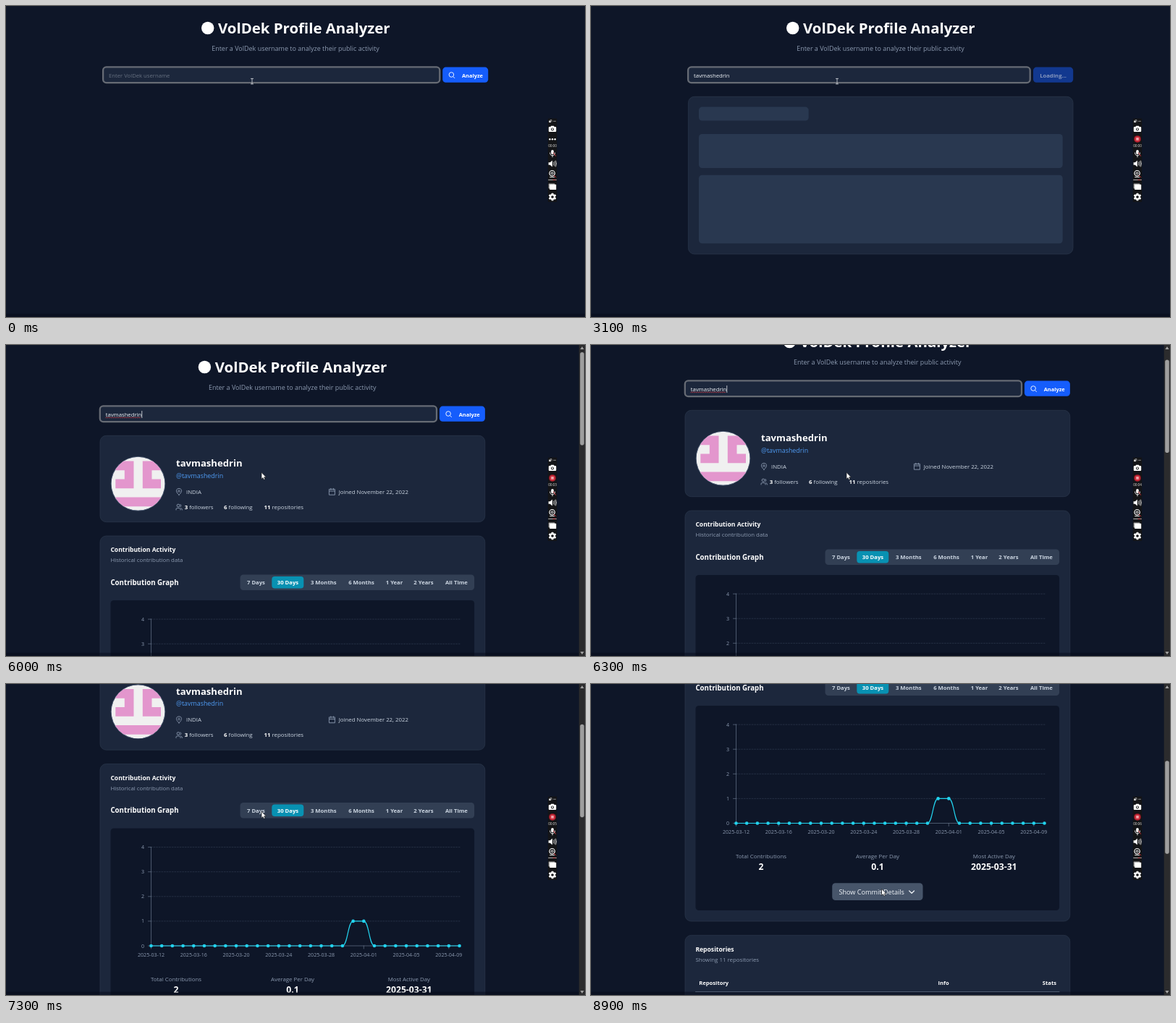
Animation, 800 px wide and 430 px high, one loop 9 s. Source, as an HTML page:

```html
<!DOCTYPE html>
<html lang="en">
<head>
<meta charset="utf-8">
<title>Profile Analyzer</title>
<style>
  html, body { margin: 0; width: 100%; height: 100%; overflow: hidden; background: #0e1628; }
  svg { display: block; width: 800px; height: 430px; font-family: "Open Sans", "Noto Sans", sans-serif; }
  text { white-space: pre; }
  .b { font-weight: 700; }
  .line { fill: none; stroke-width: .9; stroke-linecap: round; stroke-linejoin: round; }
</style>
</head>
<body>
<svg id="stage" viewBox="0 0 800 430"></svg>
<script>
const BG = '#0e1628', CARD = '#1c273c', SLATE = '#323f54', MUTED = '#8c9ab0',
      SOFT = '#cbd5e1', WHITE = '#ffffff', CYAN = '#22d3ee', HINT = '#667080';
const USER = 'tavmashedrin';
const LOOP = 9000, STEP = 100;
const LOAD = 2500, DONE = 5000, RECORD = 2200, HOVER = 8800;

// Text is placed by its vertical centre.
const text = (x, cy, size, str, fill = WHITE, { bold = 0, anchor = 'start', id = '' } = {}) =>
  `<text ${id && `id="${id}"`} x="${x}" y="${(cy + size * .355).toFixed(2)}" font-size="${size}" fill="${fill}"` +
  ` text-anchor="${anchor}" ${bold ? 'class="b"' : ''}>${str}</text>`;
const rect = (x, y, w, h, rx, fill, extra = '') =>
  `<rect x="${x}" y="${y}" width="${w}" height="${h}" rx="${rx}" fill="${fill}" ${extra}/>`;
const circle = (cx, cy, r, fill, extra = '') =>
  `<circle cx="${cx}" cy="${cy}" r="${r}" fill="${fill}" ${extra}/>`;
const line = (d, stroke, extra = '') => `<path class="line" d="${d}" stroke="${stroke}" ${extra}/>`;
const group = (id, body, extra = '') => `<g id="${id}" ${extra}>${body}</g>`;
const card = (x, y, w, h) => rect(x, y, w, h, 8.5, CARD, 'stroke="#2b384d" stroke-width=".7"');
const each = (n, fn) => Array.from({ length: n }, (_, i) => fn(i)).join('');
const mid = { anchor: 'middle' }, bold = { bold: 1 }, boldMid = { bold: 1, anchor: 'middle' };

function header() {
  return circle(278.7, 30.5, 8.7, WHITE) +
    text(293, 31.2, 20.4, 'VolDek Profile Analyzer', WHITE, bold) +
    text(400, 58.7, 8.97, 'Enter a VolDek username to analyze their public activity', MUTED, mid) +
    rect(134.1, 84.4, 465.2, 21.7, 4.5, CARD, 'id="field" stroke="#666b74" stroke-width="2.3"') +
    text(142, 96, 7.7, '', HINT, { id: 'entry' }) +
    line('', '#e0444e', 'id="squiggle" style="stroke-width:.7"') +
    rect(0, 91, .7, 10, 0, WHITE, 'id="caret"') +
    group('analyze', rect(603.2, 84.6, 63, 21.2, 4.5, '#155dfc') +
      line('M618.2 98 L619.8 99.6', WHITE) +
      circle(615.4, 95, 3.3, 'none', 'stroke="#fff" stroke-width=".9"') +
      text(644.5, 96, 7.45, 'Analyze', WHITE, boldMid)) +
    group('loading', rect(611, 84.6, 55.2, 21.2, 4.5, '#12388f') +
      text(638.6, 96, 7.7, 'Loading...', '#8596bd', boldMid));
}

function skeleton() {
  const block = (y, w, h) => rect(149, y, w, h, 4.5, '#293850');
  return card(134.4, 125.3, 531.6, 217.7) + block(139.6, 151.7, 19) + block(177, 502.7, 47) + block(233.7, 502.7, 94.6);
}

function avatar() {
  const rows = ['11011', '01010', '11011', '00000', '11111'];
  const cells = rows.map((row, r) => [...row].map((on, c) =>
    on === '1' ? `M${151.3 + c * 12.5} ${160.5 + r * 12.5} h12.7 v12.7 h-12.7z` : '').join('')).join('');
  return `<clipPath id="round">${circle(182.5, 191.8, 37, WHITE)}</clipPath>` +
    circle(182.5, 191.8, 37.7, '#526078') +
    `<g clip-path="url(#round)">${circle(182.5, 191.8, 37, '#f0f0f0')}<path d="${cells}" fill="#e396cd"/></g>`;
}

function profile() {
  const count = (x, n, label) =>
    text(x, 224, 7.85, `<tspan class="b" fill="#fff">${n}</tspan> ${label}`, SOFT);
  return card(130, 125.3, 531.8, 119.4) + avatar() +
    text(235, 163.5, 13.1, USER, WHITE, bold) +
    text(235, 180.5, 8.9, '@' + USER, '#4f9cf5') +
    line('M239 207.3 C233.6 202.5 235 198.4 239 198.4 S244.4 202.5 239 207.3Z', MUTED) +
    circle(239, 202, 1.3, 'none', `stroke="${MUTED}" stroke-width=".8"`) +
    text(249, 203, 7.85, 'INDIA', SOFT) +
    line('M446.8 199.4h7.6v7.8h-7.6z M446.8 202h7.6 M448.8 198.3v2 M452.4 198.3v2', MUTED) +
    text(459.7, 203, 7.85, 'Joined November 22, 2022', SOFT) +
    circle(238, 222, 1.9, 'none', `stroke="${MUTED}" stroke-width=".9"`) +
    line('M235 228 V227 Q235 225.5 236.6 225.5 H239.4 Q241 225.5 241 227 V228 M241 220.3 Q243.2 222 241 223.8 M242 225.6 Q243.5 226 243.5 228', MUTED) +
    count(246.7, 3, 'followers') + count(301, 6, 'following') + count(356.5, 11, 'repositories');
}

const PX = i => 200.5 + i * 14.69, PY = v => 515.5 - v * 34.1;
const COUNT = 30, isPeak = i => i === 19 || i === 20;

function chart() {
  const day = i => new Date(Date.UTC(2025, 2, 12 + i)).toISOString().slice(0, 10);
  const grid = each(5, v =>
    (v ? line(`M200.5 ${PY(v)} H627`, '#344156', 'stroke-dasharray="1.8 1.8" style="stroke-width:.6"') : '') +
    line(`M196.5 ${PY(v)} H200.5`, '#66748a', 'style="stroke-width:.7"') +
    text(191, PY(v), 7.1, v, MUTED, { anchor: 'end' }));
  const dates = each(8, k =>
    line(`M${PX(k * 4)} 515.5 v4`, '#66748a', 'style="stroke-width:.7"') +
    text(PX(k * 4), 527.5, 7.1, day(k * 4), MUTED, mid));
  const slope = (a, b, va, vb) => {
    const m = (PX(a) + PX(b)) / 2;
    return `C${m} ${PY(va)} ${m} ${PY(vb)} ${PX(b)} ${PY(vb)}`;
  };
  const curve = `M${PX(0)} ${PY(0)} H${PX(18)} ${slope(18, 19, 0, 1)} H${PX(20)} ${slope(20, 21, 1, 0)} H${PX(29)}`;
  return grid + dates +
    line('M200.5 379 V515.5 H627', '#66748a', 'style="stroke-width:.7"') +
    group('marker', line(`M${PX(10)} 379 V515.5`, '#b4b9c2')) +
    line(curve, CYAN, 'style="stroke-width:1.2"') +
    each(COUNT, i => circle(PX(i).toFixed(2), PY(isPeak(i) ? 1 : 0), 2.3, CYAN)) +
    circle(PX(10), PY(0), 3.4, CYAN, 'id="active"');
}

function activity() {
  const tabs = [['7 Days', 345.5], ['30 Days', 389.5], ['3 Months', 438.8], ['6 Months', 491],
                ['1 Year', 536.5], ['2 Years', 577], ['All Time', 622.4]];
  const stats = [['Total Contributions', '2', 235], ['Average Per Day', '0.1', 396], ['Most Active Day', '2025-03-31', 556.8]];
  return card(130, 264, 531.8, 387) +
    text(144.4, 283.2, 8.58, 'Contribution Activity', WHITE, bold) +
    text(144.4, 297.4, 7.86, 'Historical contribution data', MUTED) +
    text(144.4, 328.4, 9.7, 'Contribution Graph', WHITE, bold) +
    rect(323.5, 317.5, 323.6, 21.6, 4.5, SLATE) + rect(367.3, 320, 44, 16.4, 4, '#0891b2') +
    tabs.map(([s, x], i) => text(x, 328.3, 7.7, s, i === 1 ? WHITE : SOFT, boldMid)).join('') +
    rect(144.5, 353, 502.6, 283, 4.5, BG) + chart() +
    stats.map(([s, v, x]) => text(x, 561.5, 7.86, s, MUTED, mid) + text(x, 575.7, 12.2, v, WHITE, boldMid)).join('') +
    rect(333.2, 598.3, 125.3, 23.7, 4.5, SLATE, 'id="details"') +
    text(342.4, 610.5, 9.15, 'Show Commit Details', '#f1f5f9') +
    line('M439.7 609 l3.4 3.3 l3.4 -3.3', '#f1f5f9', 'style="stroke-width:1.2"') +
    group('tooltip', rect(0, 0, 80.5, 44, 4.5, CARD, 'stroke="#2f3c52" stroke-width=".7"') +
      text(7.2, 16, 9.6, '2025-03-22', '#e2e8f0', bold) +
      text(7.2, 30, 8.7, '0 contributions', '#22b8d4', bold));
}

function repositories() {
  return card(130, 670.4, 531.8, 400) +
    text(144.4, 690, 8.58, 'Repositories', WHITE, bold) +
    text(144.4, 704.6, 7.86, 'Showing 11 repositories', MUTED) +
    text(149.3, 736.4, 7.6, 'Repository', WHITE, bold) +
    text(479.5, 736.4, 7.6, 'Info', WHITE, bold) +
    text(643, 736.4, 7.6, 'Stats', WHITE, { bold: 1, anchor: 'end' }) +
    line('M144.5 748.5 H647', '#66748a');
}

function scrollbar() {
  return rect(791.7, 0, 8.3, 430, 0, '#2b2b2d') +
    '<path d="M793.4 6 l2.6 -4 2.6 4z M793.4 424 l2.6 4 2.6 -4z" fill="#a0a0a0"/>' +
    rect(793.2, 10, 5.6, 128.5, 2.8, '#9f9f9f', 'id="thumb"');
}

function recorder() {
  const ring = (cx, cy, r, w) => circle(cx, cy, r, 'none', `stroke="#fff" stroke-width="${w}"`);
  return rect(748.8, 155.5, 12.4, 115.5, 1, '#131417') +
    rect(750.2, 158.5, 2.6, 2.6, 0, '#ddd') + line('M752 157.6 h2 v2.4', '#ddd', 'style="stroke-width:.6"') +
    line('M756.5 159.3 h3', '#bbb', 'style="stroke-width:.7"') +
    rect(749.8, 167, 10.4, 7, 1, WHITE) + rect(752.8, 165.8, 4.4, 2, .5, WHITE) +
    circle(755, 170.4, 2, '#131417') + circle(755, 170.4, 1.1, WHITE) +
    group('dots', each(3, i => circle(751.4 + i * 3.6, 184.3, 1.2, WHITE))) +
    group('rec', circle(755, 183.9, 5, '#7d1823') + circle(755, 183.9, 4, '#c92b39') + rect(753.2, 182.1, 3.6, 3.6, .5, '#f0a3a9')) +
    text(755, 193, 4.6, '', '#e6e6e6', { anchor: 'middle', id: 'timer' }) +
    rect(753.2, 199, 3.6, 6.2, 1.8, WHITE) + line('M751.6 203 Q751.6 206.7 755 206.7 T758.4 203 M755 206.8 v2', WHITE) +
    line('M756.4 202.8 l3 4.4', '#e23b45') +
    '<path d="M749.6 216.2 h2.2 l3 -2.7 v9 l-3 -2.7 h-2.2z" fill="#fff"/>' +
    line('M756.4 216 q1.2 2 0 4 M758 214.8 q2 3.2 0 6.4 M759.6 214 q2.2 4 0 8', WHITE, 'style="stroke-width:.7"') +
    ring(754.6, 231.2, 3.7, 1.2) + ring(754.6, 231.2, 1.4, 1) +
    line('M751.6 236.6 h6', WHITE) + line('M757.2 234.2 l2.4 2.6', '#e23b45') +
    line('M749.6 240.4 h10.8', '#ddd', 'style="stroke-width:.8"') + line('M756 240.4 h3', '#e23b45', 'style="stroke-width:.8"') +
    rect(749.7, 245.4, 8.6, 7, .6, '#aaa') + rect(751.2, 246.8, 9, 7.2, .6, WHITE) +
    circle(755, 264, 4, WHITE) +
    each(3, i => rect(753.6, 258.7, 2.8, 10.6, .5, WHITE, `transform="rotate(${i * 60} 755 264)"`)) +
    circle(755, 264, 1.8, '#131417');
}

document.getElementById('stage').innerHTML =
  rect(0, 0, 800, 430, 0, BG) +
  group('page', group('header', header()) + group('skeleton', skeleton()) +
    group('result', profile() + activity() + repositories())) +
  rect(0, 425.6, 800, 4.4, 0, '#050a18', 'opacity=".45"') +
  group('scrollbar', scrollbar()) + group('recorder', recorder()) +
  group('beam', line('M338.4 100.4 h3.2 M340 100.4 v7.4 M338.4 107.8 h3.2', '#d5d8de', 'style="stroke-width:.8"')) +
  group('arrow', '<path d="M0 0 V9 L2 7.2 L3.4 10 L4.9 9.3 L3.6 6.5 H6.3Z" fill="#fff" stroke="#111" stroke-width=".6"/>');

const el = {};
document.querySelectorAll('[id]').forEach(node => el[node.id] = node);
const show = (node, on) => node.setAttribute('display', on ? 'inline' : 'none');
const move = (node, x, y) => node.setAttribute('transform', `translate(${x} ${y})`);

// Interpolates rows of [time, ...values].
function track(rows, t) {
  if (t <= rows[0][0]) return rows[0].slice(1);
  const k = rows.findIndex(row => row[0] > t);
  if (k < 0) return rows[rows.length - 1].slice(1);
  const a = rows[k - 1], b = rows[k], p = (t - a[0]) / (b[0] - a[0]);
  return a.slice(1).map((v, i) => v + (b[i + 1] - v) * p);
}

const SCROLL = [[6100, 0], [6300, 35], [6500, 56], [6600, 59.5], [6800, 78], [7300, 153.5],
                [7700, 238], [7900, 281], [8000, 293.3], [8200, 315], [8400, 323]];
const POINTER = [[5500, 339, 138], [5600, 353, 176.3], [8300, 353, 176.3], [8700, 390, 248], [8800, 401.5, 283.3]];
const TOOLTIP = [[7900, 162, 345], [8000, 220, 383.8], [8100, 318, 452], [8300, 357, 483]];

function draw(t) {
  const loading = t >= LOAD && t < DONE, done = t >= DONE;
  const typed = Math.max(0, Math.min(USER.length, Math.floor((t - 900) / 100)));
  const [scroll] = track(SCROLL, t);

  move(el.page, 0, -scroll);
  move(el.header, done ? -4.3 : 0, 0);
  show(el.skeleton, loading);
  show(el.result, done);
  show(el.scrollbar, done);
  show(el.analyze, !loading);
  show(el.loading, loading);
  el.field.setAttribute('width', loading ? 472.6 : 465.2);
  el.thumb.setAttribute('y', 10 + scroll * .298);

  el.entry.textContent = typed ? USER.slice(0, typed) : 'Enter VolDek username';
  el.entry.setAttribute('fill', typed ? '#f1f5f9' : HINT);
  const end = 142 + (typed ? el.entry.getComputedTextLength() : 0);
  el.caret.setAttribute('x', end + .3);
  show(el.caret, typed && !loading && t % 1000 < 500);
  show(el.squiggle, done);
  el.squiggle.setAttribute('d', 'M142 100.4' + ' q.75 -1 1.5 0 t1.5 0'.repeat(Math.floor((end - 142) / 3)));

  const hovering = t >= 7900 && t < 8500;
  [el.marker, el.active, el.tooltip].forEach(node => show(node, hovering));
  move(el.tooltip, ...track(TOOLTIP, t));
  el.details.setAttribute('fill', t >= HOVER ? '#47556a' : SLATE);

  show(el.beam, t < 5500);
  show(el.arrow, t >= 5500);
  move(el.arrow, ...track(POINTER, t));

  const recording = t >= RECORD;
  show(el.dots, !recording);
  show(el.rec, recording);
  el.timer.textContent = '00:0' + (recording ? Math.floor((t - RECORD) / 1000) : 0);
}

const start = performance.now();
function frame() {
  const t = (performance.now() - start) % LOOP;
  draw(Math.floor(t / STEP) * STEP);
  requestAnimationFrame(frame);
}
frame();
</script>
</body>
</html>
```
